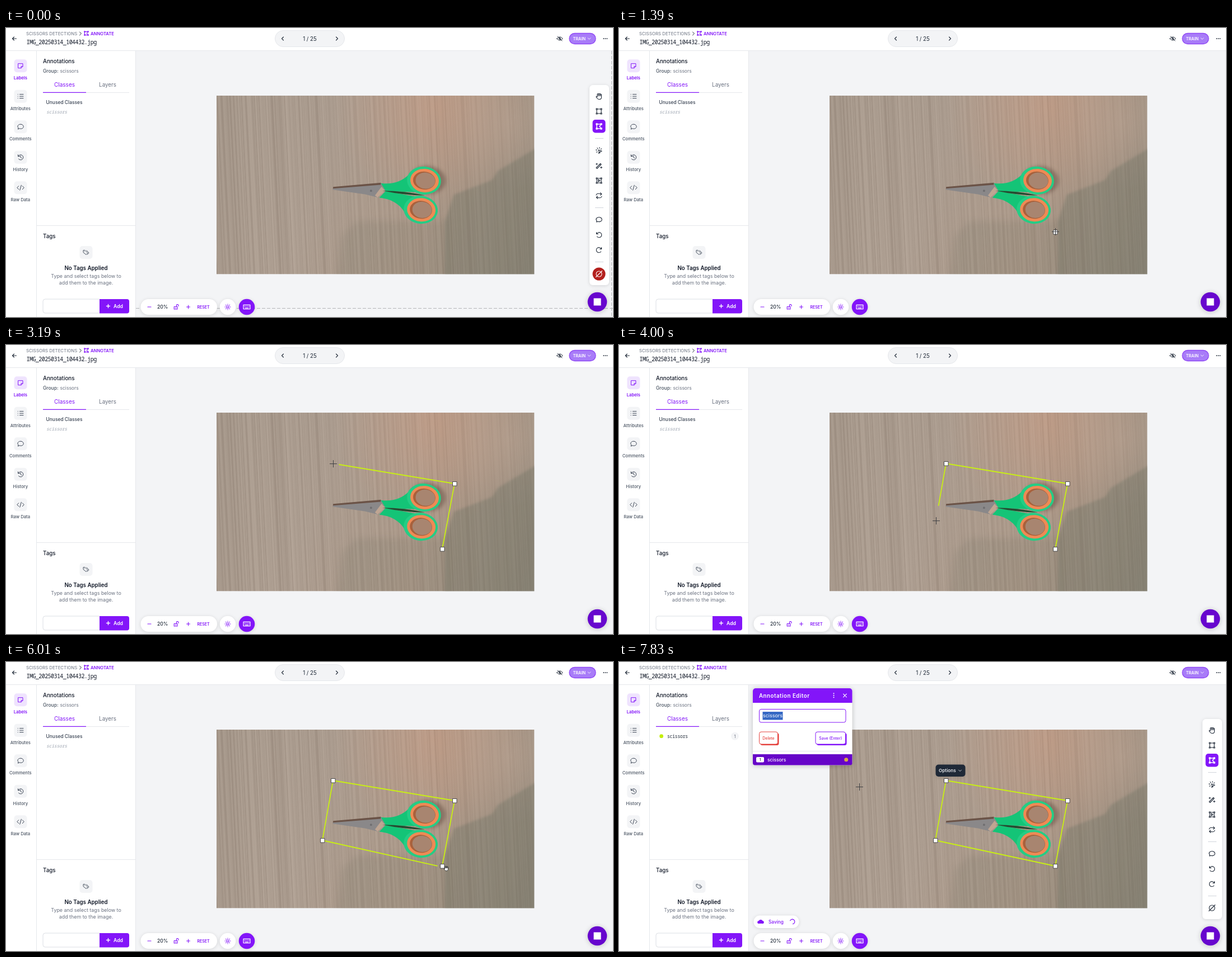
These frames come from a looping animation (1084 px wide and 517 px high, 8 s). An HTML page with a canvas:

```html
<!DOCTYPE html>
<html lang="en">
<head>
<meta charset="utf-8">
<title>Polygon annotation</title>
<style>
html, body { margin: 0; width: 100%; height: 100%; overflow: hidden; background: #fff; }
canvas { display: block; width: 1084px; height: 517px; }
</style>
</head>
<body>
<canvas id="stage"></canvas>
<script>
const W = 1084, H = 517, LOOP = 8000, STEP = 200, LAG = 120;
const canvas = document.getElementById('stage');
const ratio = window.devicePixelRatio || 1;
canvas.width = W * ratio;
canvas.height = H * ratio;
const c = canvas.getContext('2d');

const PURPLE = '#8315f9', DEEP = '#6706ce', INK = '#1f2937', GRAY = '#6b7280';
const EDGE = '#e5e7eb', PALE = '#f3f4f6', LIME = '#c8ee14';
const SANS = 'Inter, sans-serif', MONO = '"Noto Sans Mono", monospace';
const PIC = { x: 376, y: 121, w: 567.5, h: 319.5 };

// Timeline: polygon corners with the time each one is set, and the pointer's legs
const CORNERS = [
  { at: 1200, x: 779, y: 365 }, { at: 2600, x: 801, y: 248 },
  { at: 3600, x: 584, y: 212 }, { at: 4800, x: 565, y: 319 }
];
const [A, B, C, D] = CORNERS;
const CLOSED = 7400, SAVED = 7800;
const easeOut = u => 1 - (1 - u) ** 3;
const smooth = u => u * u * (3 - 2 * u);
const LEGS = [
  { from: 0, time: 900, to: A, ease: easeOut },
  { from: 1350, time: 900, to: B, ease: smooth },
  { from: 2300, time: 900, to: C, ease: smooth },
  { from: 3540, time: 530, to: D, ease: smooth },
  { from: 5200, time: 800, to: { x: 784, y: 368 }, ease: smooth, lift: 250 },
  { from: 6600, time: 300, to: { x: 779, y: 366 }, ease: smooth },
  { from: 7200, time: 600, to: { x: 429, y: 223 }, ease: easeOut }
];

function pointerAt(t) {
  let p = { x: 1083, y: 504 };
  for (const { from, time, to, ease, lift = 0 } of LEGS) {
    if (t < from) break;
    const e = ease(Math.min(1, (t - from) / time));
    p = {
      x: p.x + (to.x - p.x) * e,
      y: p.y + (to.y - p.y) * e - lift * Math.sin(Math.PI * e) * (1 - e) ** 2
    };
  }
  return p;
}

function rect(x, y, w, h, r, fill, line, lw = 1) {
  c.beginPath();
  c.roundRect(x, y, w, h, r);
  if (fill) { c.fillStyle = fill; c.fill(); }
  if (line) { c.strokeStyle = line; c.lineWidth = lw; c.stroke(); }
}
function oval(x, y, rx, ry, fill) {
  c.beginPath();
  c.ellipse(x, y, rx, ry, 0, 0, 7);
  c.fillStyle = fill;
  c.fill();
}
const dot = (x, y, r, fill) => oval(x, y, r, r, fill);
function shape(d, fill) {
  c.fillStyle = fill;
  c.fill(new Path2D(d));
}
function icon(d, x, y, color = INK, { lw = 1.1, turn = 0, scale = 1, flip = 1, fill } = {}) {
  c.save();
  c.translate(x, y);
  c.rotate(turn * Math.PI / 2);
  c.scale(scale * flip, scale);
  if (fill) shape(d, fill);
  c.strokeStyle = color;
  c.lineWidth = lw;
  c.lineCap = c.lineJoin = 'round';
  c.stroke(new Path2D(d));
  c.restore();
}
function text(s, x, y, size, color = INK, weight = 400, align = 'left', gap = 0, font = SANS) {
  c.font = `${weight} ${size}px ${font}`;
  c.fillStyle = color;
  c.textAlign = align;
  c.letterSpacing = gap + 'px';
  c.fillText(s, x, y);
}
function raised(draw, blur = 6, alpha = 0.13) {
  c.save();
  c.shadowColor = `rgba(0,0,0,${alpha})`;
  c.shadowBlur = blur * ratio;
  c.shadowOffsetY = ratio;
  draw();
  c.restore();
}
function line(x1, y1, x2, y2, color, lw = 1, dash = []) {
  c.beginPath();
  c.setLineDash(dash);
  c.moveTo(x1, y1);
  c.lineTo(x2, y2);
  c.strokeStyle = color;
  c.lineWidth = lw;
  c.stroke();
  c.setLineDash([]);
}
function inPhoto(draw) {
  c.save();
  c.beginPath();
  c.rect(PIC.x, PIC.y, PIC.w, PIC.h);
  c.clip();
  draw();
  c.restore();
}

// Icon parts, drawn around the origin
const each = (n, f) => Array.from({ length: n }, (_, i) => f(i)).join('');
const ring = r => `M${-r} 0a${r} ${r} 0 1 0 ${2 * r} 0a${r} ${r} 0 1 0 ${-2 * r} 0`;
const ray = (a, r1, r2) => `M${Math.cos(a) * r1} ${Math.sin(a) * r1}L${Math.cos(a) * r2} ${Math.sin(a) * r2}`;
const speck = (x, y) => `M${x} ${y}h.2`;
const handles = each(4, i => `M${i % 2 ? 3 : -5} ${i > 1 ? 3 : -5}h2v2h-2z`) + 'M-3 -4H3M-3 4H3M-4 -3V3';
const undo = 'M-4 -1.8A4.6 4.6 0 1 1 -3.5 3M-4.5 -4.5V-1.5H-1.5';
const halfLoop = 'M-5 -1C-4.5 -4 -1 -4.5 4.5 -3M2.5 -5.5L4.8 -3L2.5 -.8';
const I = {
  chevron: 'M-1.5 -3L1.5 0L-1.5 3',
  back: 'M3.5 0H-3.5M-.5 -3L-3.5 0L-.5 3',
  note: 'M-4 -4H4V1L1 4H-4ZM4 1H1V4',
  list: each(3, i => `M-1.5 ${i * 3.5 - 3.5}H5` + speck(-4.8, i * 3.5 - 3.5)),
  chat: 'M-4.5 4L-4 1.8C-7 -1.5 -3.5 -4.5 0 -4.5C3 -4.5 5.2 -2.7 5.2 -.3C5.2 3 1.5 4.3 -1.8 3.2Z',
  history: undo + 'M0 -2.3V.3L2 1.5',
  code: 'M-3.3 -3L-6.2 0L-3.3 3M3.3 -3L6.2 0L3.3 3M1.3 -4.5L-1.3 4.5',
  tag: 'M-5 -3.5V0L0 4L3 1L-1.5 -3.5ZM1 -3.5L5 .7L2.2 3.8' + speck(-3, -1.7),
  eye: ring(1.5) + 'M-5 0C-2.5 -4 2.5 -4 5 0C2.5 4 -2.5 4 -5 0ZM-4 -4L4 4',
  hand: 'M-3 1V-3.5' + each(3, () => 'q1 -2 1.9 0v3v-3') + 'q1.7 -.5 1.7 1.5V1.5C4.4 7 -1 6.5 -3 4L-5 1.3Q-5 -.5 -3 1',
  box: handles + 'M4 -3V3',
  poly: handles + 'M3.4 -3L1 0L3.4 3',
  smart: handles + 'M4 -3V3M-1.5 -2L2 0L-1.5 2Z',
  click: 'M-1 -1L5 1.2L2.2 2.2L1.2 5Z' + each(6, i => ray(1.7 + i * 0.8, 3.8, 5.5)),
  wand: 'M-5 4L2.5 -3.5L4 -2L-3.5 5.5ZM1 -2L2.5 -.5M-4 -4V-1.5M-5.3 -2.8H-2.7M4 2V5M2.5 3.5H5.5',
  repeat: halfLoop + 'M5 1C4.5 4 1 4.5 -4.5 3M-2.5 5.5L-4.8 3L-2.5 .8',
  undo,
  none: ring(5) + 'M5.5 -5.5L-5.5 5.5',
  lock: 'M-3.8 -.5H2V4H-3.8ZM.3 -.5V-2.5A1.8 1.8 0 0 1 4 -2.5V-1.5M-.9 1.3V2.2',
  sun: ring(2) + each(8, i => ray(i * Math.PI / 4, 4, 5)),
  keys: 'M-6 -3.7H6V3.7H-6ZM-2.5 2H2.5' + each(8, i => speck(i % 4 * 2.5 - 3.8, i < 4 ? -1.5 : 0.3)),
  plus: 'M-3 0H3M0 -3V3',
  minus: 'M-3 0H3',
  close: 'M-2.8 -2.8L2.8 2.8M2.8 -2.8L-2.8 2.8'
};

// Soft wood grain: one slightly tilted gradient with seeded stops
function grain() {
  let seed = 11;
  const rnd = () => (seed = seed * 16807 % 2147483647) / 2147483647;
  const g = c.createLinearGradient(366, 310, 952, 281), n = 360;
  for (let i = 0; i <= n; i++) {
    const v = rnd() - 0.5, a = Math.abs(v) * (0.3 - 0.17 * i / n);
    g.addColorStop(i / n, v > 0 ? `rgba(230,216,202,${a})` : `rgba(82,64,52,${a})`);
  }
  return g;
}
const wood = grain();

function fillPhoto(fill) {
  c.fillStyle = fill;
  c.fillRect(PIC.x, PIC.y, PIC.w, PIC.h);
}
function glow(x, y, r, rgb, alpha) {
  const g = c.createRadialGradient(x, y, 0, x, y, r);
  g.addColorStop(0, `rgba(${rgb},${alpha})`);
  g.addColorStop(1, `rgba(${rgb},0)`);
  fillPhoto(g);
}

function photo() {
  const g = c.createLinearGradient(376, 200, 943, 380);
  ['#a6988b', '#ac9d90', '#ab9888', '#958a7c'].forEach((color, i) => g.addColorStop(i / 3, color));
  fillPhoto(g);
  glow(765, 140, 180, '200,156,132', 0.6);
  glow(900, 170, 120, '186,164,148', 0.5);
  c.filter = 'blur(2px)';
  shape('M950 213L878 256L868 272L800 298L784 345V450H950Z', 'rgba(114,118,104,.42)');
  c.filter = 'blur(6px)';
  shape('M790 345L625 346L600 372L590 450H790Z', 'rgba(114,114,100,.2)');
  c.filter = 'none';
  fillPhoto(wood);
  scissors();
}

function scissors() {
  c.save();
  c.translate(672, 291);
  c.rotate(0.111);
  c.filter = 'blur(3px)';
  oval(79, -28, 32, 25, 'rgba(70,48,38,.35)');
  c.filter = 'none';
  shape('M-88 5L-4 -13L5 0L-6 13L-30 10L-88 8Z', '#8a8889');
  shape('M-88 3L-4 -14V-10L-88 6Z', '#6b5347');
  shape('M-12 10L-2 -7L5 0L-7 13Z', '#bfa592');
  dot(-20, 2.5, 2, '#6f6e70');
  for (const side of [-1, 1]) {
    c.save();
    c.scale(1, side);
    shape('M-4 13C17 13 32 19 44 34L56 45L88 6L6 0Z', '#14c477');
    oval(72, 26.3, 30.5, 25, '#24cd85');
    oval(73, 26.3, 25.5, 21, '#ee8a55');
    oval(72.5, 26.3, 20, 16, '#a8613c');
    oval(74.5, 26.3, 17.5, 14.5, '#a88570');
    c.restore();
  }
  shape('M0 0Q40 -4 77 0Q40 4 0 0Z', '#244c31');
  c.restore();
}

function crosshair(x, y) {
  line(x, 41, x, H, '#b4b5b8', 1, [6, 3]);
  line(232, y, W, y, '#b4b5b8', 1, [6, 3]);
  inPhoto(() => {
    line(x - 0.5, PIC.y, x - 0.5, H, '#f4f1ee', 1.6, [5, 3]);
    line(PIC.x, y - 0.5, W, y - 0.5, '#f4f1ee', 1.6, [5, 3]);
  });
}

const armed = t => t >= 6800 && t < CLOSED;

function polygon(t) {
  const set = CORNERS.filter(k => k.at <= t);
  if (!set.length) return;
  const end = pointerAt(t - LAG);
  c.beginPath();
  set.forEach(k => c.lineTo(k.x, k.y));
  if (t < CLOSED) c.lineTo(end.x, end.y);
  else c.closePath();
  c.strokeStyle = LIME;
  c.lineWidth = 1.8;
  c.lineJoin = 'round';
  c.stroke();
  if (armed(t)) dot(A.x, A.y + 3.5, 8, '#c9c723');
  for (const k of set) {
    if (k === A && armed(t)) rect(k.x - 5.5, k.y - 5, 11, 10, 0, '#79f002', '#4c7c16');
    else rect(k.x - 3.5, k.y - 3.5, 7.5, 7.5, 0, '#fff', '#4b4b4b');
  }
}

function pointer(t) {
  const { x, y } = pointerAt(t);
  if (t >= 6000 && !armed(t) && t < CLOSED) {
    icon(I.hand, x + 2, y + 1, '#222', { scale: 0.8, fill: '#fff' });
    return;
  }
  const s = armed(t) ? 4.5 : 6.5, color = armed(t) ? '#3f7a14' : '#3f4043';
  const px = Math.round(x) + 0.5, py = Math.round(y) + 0.5;
  line(px - s, py, px + s, py, color);
  line(px, py - s, px, py + s, color);
}

function toolbar(red) {
  raised(() => rect(1042, 102, 35, 358, 6, '#fff'));
  let y = 122;
  for (const name of 'hand box poly | click wand smart repeat | chat undo redo | none'.split(' ')) {
    if (name === '|') {
      line(1052, y - 5.5, 1067, y - 5.5, '#d1d5db');
      y += 16;
      continue;
    }
    const active = name === 'poly', off = name === 'none' && red;
    if (active) rect(1047.5, y - 12, 23, 23.5, 5, PURPLE);
    if (off) dot(1059, y, 11.5, '#b3201d');
    icon(I[name] || I.undo, 1059, y, active || off ? '#fff' : INK,
      { flip: name === 'redo' ? -1 : 1, lw: active ? 1.4 : 1.1 });
    y += 27;
  }
}

function header() {
  c.fillStyle = '#fff';
  c.fillRect(0, 0, W, 40);
  line(0, 40.5, W, 40.5, EDGE);
  icon(I.back, 15, 19);
  text('SCISSORS DETECTIONS', 36, 12.7, 7.85, GRAY);
  icon(I.chevron, 133, 10, INK, { lw: 1 });
  icon(I.poly, 143.5, 9.5, PURPLE, { lw: 1.5, scale: 0.75 });
  text('ANNOTATE', 151, 12.7, 7.7, PURPLE, 600);
  text('IMG_20250314_104432.jpg', 36.5, 29, 10, '#111827', 400, 'left', -0.56, MONO);
  rect(480.5, 4.5, 124, 29, 14.5, PALE, EDGE);
  icon(I.chevron, 494, 19, INK, { flip: -1 });
  icon(I.chevron, 591, 19);
  text('1 / 25', 542.5, 22.6, 9.76, INK, 400, 'center');
  icon(I.eye, 989, 19, INK, { lw: 1 });
  rect(1006, 9.5, 47, 19, 9.5, '#a87cf8', '#9047f5', 1.3);
  text('TRAIN', 1012.5, 21.7, 7.3, '#fff', 600);
  icon(I.chevron, 1041.5, 19, '#fff', { turn: 1, scale: 0.8 });
  for (const i of [-1, 0, 1]) dot(1070.3 + i * 3, 19, 0.9, INK);
}

function rail() {
  const tabs = { Labels: 'note', Attributes: 'list', Comments: 'chat', History: 'history', 'Raw Data': 'code' };
  Object.keys(tabs).forEach((label, i) => {
    const y = 67.7 + i * 54.5, on = i === 0;
    rect(14.5, y - 11.5, 23, 23, 5, on ? '#efe3fe' : PALE);
    icon(I[tabs[label]], 26, y, on ? PURPLE : '#374151', { lw: 1 });
    text(label, 25.8, y + 24.3, 7.7, on ? PURPLE : '#4b5563', on ? 600 : 500, 'center');
  });
}

function sidebar(done) {
  c.fillStyle = '#fff';
  c.fillRect(0, 41, 231, 476);
  for (const x of [54.5, 231.5]) line(x, 41, x, H, EDGE);
  rail();
  text('Annotations', 66, 62.5, 9.8, '#111827', 500);
  text('Group:', 66, 80, 8.5, '#4b5563', 500);
  text('scissors', 96.5, 80, 8.5, GRAY);
  text('Classes', 104.5, 105, 10, PURPLE, 400, 'center');
  text('Layers', 181.5, 105, 9.8, GRAY, 400, 'center');
  line(66, 115.5, 220, 115.5, EDGE);
  line(66, 115.4, 143, 115.4, PURPLE, 1.2);
  if (done) {
    dot(75.7, 132.7, 3.4, '#c4ee08');
    text('scissors', 86, 135.6, 8.2, INK, 400, 'left', -0.3, MONO);
    dot(207, 132.7, 7, PALE);
    text('1', 207, 135.5, 7.5, GRAY, 400, 'center');
  } else {
    text('Unused Classes', 71.5, 135.6, 8.45, '#374151', 500);
    text('scissors', 72, 152.7, 8.2, '#9ca3af', 'italic 400', 'left', -0.3, MONO);
  }

  line(55, 353.5, 231, 353.5, EDGE);
  text('Tags', 66, 375.5, 9.76, '#111827', 500);
  rect(131.5, 390, 23, 23, 5, PALE);
  icon(I.tag, 143, 401.5, '#4b5563', { lw: 1 });
  text('No Tags Applied', 143, 432.5, 9.76, '#111827', 600, 'center');
  text('Type and select tags below to', 143, 447.3, 8.9, GRAY, 400, 'center');
  text('add them to the image.', 143, 458.7, 8.9, GRAY, 400, 'center');
  rect(66, 485, 104, 25, 4, '#fff', '#dcdfe4');
  rect(167, 485, 53, 25.5, [0, 4, 4, 0], PURPLE);
  icon(I.plus, 182.5, 497.5, '#fff', { lw: 1.4 });
  text('Add', 192, 501, 8.7, '#fff', 600);
}

function controls() {
  raised(() => rect(240.5, 485, 136.5, 28, 14, '#fff'));
  icon(I.minus, 256, 499, PURPLE);
  text('20%', 270, 502, 8.6, INK, 500);
  icon(I.lock, 304, 499, PURPLE);
  icon(I.plus, 325.5, 499, PURPLE);
  text('RESET', 341.5, 501.5, 7, PURPLE, 600);
  raised(() => dot(396, 499, 14.3, '#fff'));
  icon(I.sun, 396, 499, PURPLE);
  raised(() => dot(430, 499, 14.3, PURPLE));
  icon(I.keys, 430, 499, '#fff', { lw: 1.2 });
  raised(() => dot(1056, 490, 17.3, DEEP), 10, 0.2);
  rect(1049.5, 483.5, 13, 13, 0, '#fff');
}

function button(x, w, label, color) {
  rect(x + 2, 127, w, 22, 3.5, color);
  rect(x, 125, w, 22, 3.5, '#fff', color);
  text(label, x + w / 2, 138.7, 7, color, 500, 'center');
}

function dialog() {
  raised(() => rect(239, 47, 177.5, 137.5, 5, '#fff'), 9, 0.22);
  rect(239, 47, 177.5, 26, [5, 5, 0, 0], PURPLE);
  text('Annotation Editor', 250, 63.5, 9.76, '#fff', 600, 'left', 0.5);
  for (const i of [-1, 0, 1]) dot(383.5, 59.8 + i * 3.5, 1, '#fff');
  icon(I.close, 403.5, 60, '#fff', { lw: 1.2 });
  rect(250.5, 84.5, 154.5, 23.5, 3.5, '#fff', PURPLE);
  rect(256.5, 89, 36, 14.5, 0, '#3568c4');
  text('scissors', 257, 99.3, 8.95, '#fff');
  button(250.5, 33, 'Delete', '#e5433f');
  button(351, 53.5, 'Save (Enter)', PURPLE);
  line(239, 159.5, 416, 159.5, EDGE);
  rect(239, 165, 177.5, 19.5, [0, 0, 4, 4], '#6605c8');
  rect(245, 170, 14, 9.5, 2, '#fff');
  text('1', 252, 177.2, 6.5, INK, 500, 'center');
  text('scissors', 265, 178, 8.4, '#fff', 500);
  dot(405.7, 174.8, 3.5, '#d9a747');
}

function options() {
  raised(() => rect(565.5, 183.5, 53, 21.5, 5, INK));
  text('Options', 571, 197.3, 8.1, EDGE, 600);
  icon(I.chevron, 609, 194.3, EDGE, { turn: 1, scale: 0.8 });
}

function saving(t) {
  raised(() => rect(240.5, 453.5, 81, 22.5, 11, '#fff'));
  for (const i of [-1, 0, 1]) dot(253 + i * 3.2, 465.5 - (i ? 0 : 1), i ? 2.6 : 3.6, PURPLE);
  text('Saving', 267, 467.7, 8.3, PURPLE, 500);
  c.beginPath();
  c.arc(309.5, 464.5, 4.3, t / 130, t / 130 + 4.3);
  c.strokeStyle = PURPLE;
  c.lineWidth = 1.2;
  c.stroke();
}

function draw(t) {
  const done = t >= CLOSED;
  c.setTransform(ratio, 0, 0, ratio, 0, 0);
  c.fillStyle = PALE;
  c.fillRect(0, 0, W, H);
  inPhoto(photo);
  if (t < A.at) {
    const p = pointerAt(t);
    crosshair(Math.round(p.x) - 1.5, Math.round(p.y) - 2.5);
  }
  polygon(t);
  if (done) options();
  header();
  sidebar(done);
  if (t < 1400 || done) toolbar(t < SAVED);
  controls();
  if (done) {
    saving(t);
    c.globalAlpha = t < 7600 ? 0.6 : 1;
    dialog();
    c.globalAlpha = 1;
  }
  if (t > 0) pointer(t);
}

const start = performance.now();
let shown = -1;
function loop() {
  const t = (performance.now() - start) % LOOP;
  const tick = Math.min(SAVED, Math.floor((t + 30) / STEP) * STEP);
  if (tick !== shown) draw(shown = tick);
  requestAnimationFrame(loop);
}
loop();
</script>
</body>
</html>
```
